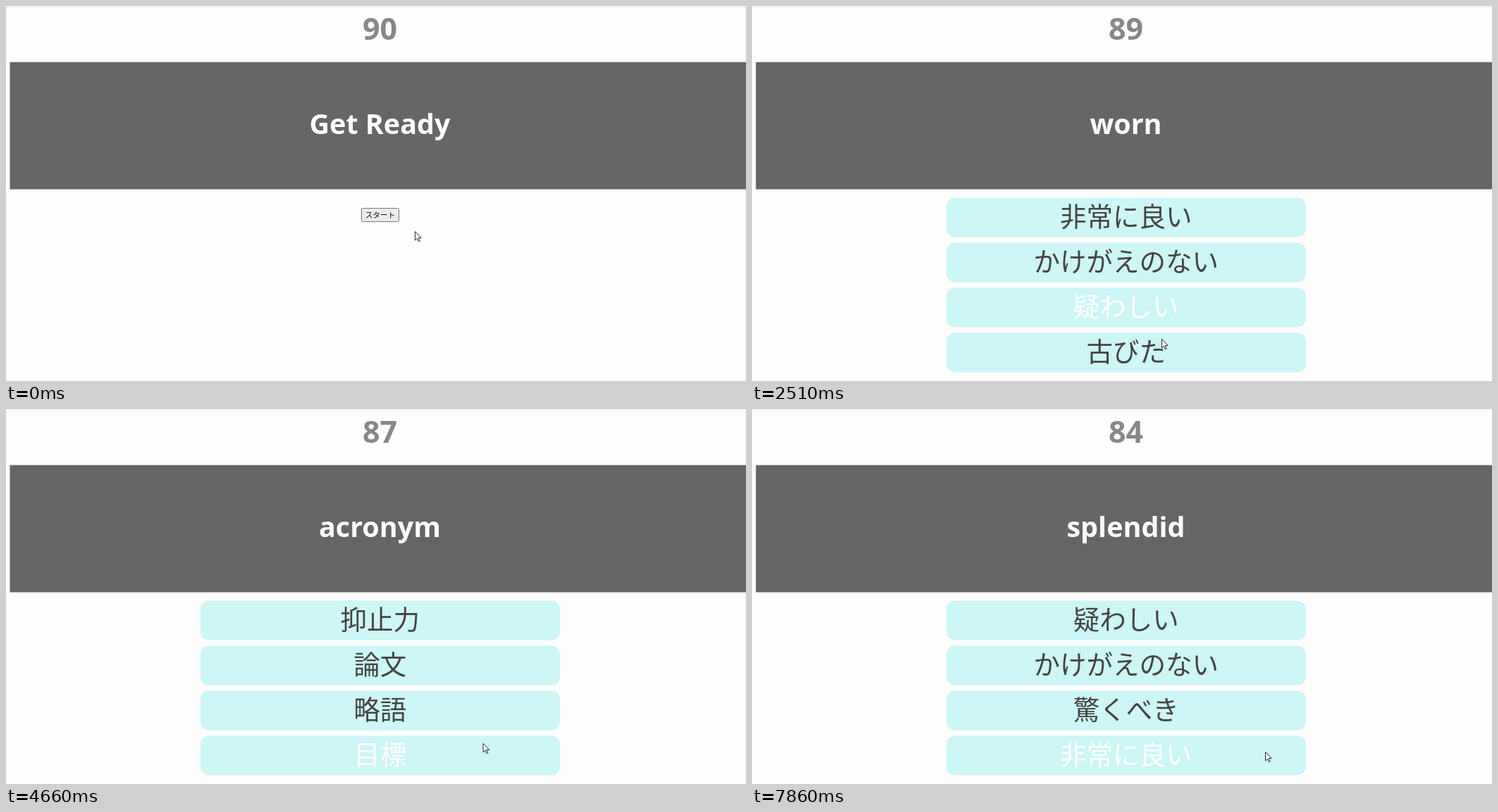
An HTML page that plays this animation: 1050x533 px, repeating every 8 s.

```html
<!DOCTYPE html>
<html lang="ja">
<head>
<meta charset="utf-8">
<title>Word quiz</title>
<style>
html, body { margin: 0; width: 100%; height: 100%; overflow: hidden; background: #fefefe; }
svg { display: block; width: 100vw; height: 100vh; }
text { text-anchor: middle; }
.bold { font-family: "Noto Sans", "Open Sans", sans-serif; font-weight: 700; }
.jp { font-family: "Noto Sans CJK JP", "Noto Sans CJK", sans-serif; }
</style>
</head>
<body>
<svg id="stage" viewBox="0 0 1050 533">
  <rect width="1050" height="533" fill="#fefefe"/>
  <rect y="1" width="1050" height="1" fill="#e9e9e9"/>
  <text id="timer" class="bold" x="530.5" y="48" font-size="43" fill="#888"></text>
  <rect x="5.5" y="79.7" width="1045" height="180.8" fill="#666"/>
  <text id="word" class="bold" x="530.5" y="182" font-size="39.5" fill="#fff"></text>
  <g id="start">
    <rect id="face" x="504.5" y="287.5" width="53" height="19" rx="2" stroke="#767676"/>
    <text class="jp" x="531" y="300.7" font-size="10.67" fill="#111">スタート</text>
  </g>
  <g id="options"></g>
  <path id="cursor" d="M.5 .5V13L3.4 10.3 5.4 14.8 7.3 14 5.3 9.6H9.2Z" fill="#fff" stroke="#111" stroke-width=".9" stroke-linejoin="round"/>
</svg>
<script>
const LOOP = 8000, STEP = 133, LAG = 75;
const PRESS = 910, FIRST_HOVER = 1970, COUNT_FROM = 1500, SECOND = 980;
const TOP = 272.5, PITCH = 64, HEIGHT = 56, LEFT = 276, WIDTH = 510;
const $ = id => document.getElementById(id);

const questions = [
  { from: 1530, solved: 2810, right: 3, word: "worn",
    answers: ["非常に良い", "かけがえのない", "疑わしい", "古びた"] },
  { from: 3350, solved: 5470, right: 2, word: "acronym",
    answers: ["抑止力", "論文", "略語", "目標"] },
  { from: 5980, solved: Infinity, right: 0, word: "splendid",
    answers: ["疑わしい", "かけがえのない", "驚くべき", "非常に良い"] }
];

// Where the pointer turns or rests: time, x, y
const turns = [
  [0, 580, 320], [510, 526, 298], [1840, 526, 298], [2090, 541, 272],
  [2360, 570, 379], [2510, 581, 473], [2930, 595, 492], [3350, 871, 144],
  [3900, 871, 144], [4510, 672, 499], [5320, 687, 420], [5470, 687, 420],
  [5740, 842, 238], [6530, 842, 238], [6900, 700, 205], [7710, 728, 487],
  [LOOP, 728, 487]
];

const easeOut = p => p * (2 - p);

function pointer(t, stepped) {
  const k = turns.findIndex(([at]) => at > t);
  const [t0, x0, y0] = turns[k - 1], [t1, x1, y1] = turns[k];
  let p = (t - t0) / (t1 - t0);
  if (stepped) {
    const n = Math.max(1, Math.round((t1 - t0) / STEP));
    p = Math.floor(p * n) / n;
  }
  const e = easeOut(p);
  return [x0 + (x1 - x0) * e, y0 + (y1 - y0) * e];
}

function optionAt([x, y]) {
  const i = Math.floor((y - TOP) / PITCH);
  const inside = x >= LEFT && x <= LEFT + WIDTH && y - TOP - i * PITCH <= HEIGHT;
  return inside ? i : -1;
}

function add(name, attrs) {
  const el = document.createElementNS("http://www.w3.org/2000/svg", name);
  for (const key in attrs) el.setAttribute(key, attrs[key]);
  return $("options").appendChild(el);
}

const options = [0, 1, 2, 3].map(i => {
  const y = TOP + i * PITCH;
  return {
    box: add("rect", { x: LEFT, y, width: WIDTH, height: HEIGHT, rx: 12 }),
    label: add("text", { class: "jp", x: 530.7, y: y + 40.5, "font-size": 37.5 })
  };
});

function drawStart(t, x, y) {
  const over = x > 504 && x < 558 && y > 287 && y < 307;
  $("face").setAttribute("fill", t >= PRESS ? "#f5f5f5" : over ? "#e5e5e5" : "#ebebeb");
}

function drawOptions(t, question) {
  const hover = t < FIRST_HOVER ? -1 : optionAt(pointer(t - LAG));
  options.forEach(({ box, label }, i) => {
    const right = t >= question.solved && i === question.right;
    box.setAttribute("fill", right ? "#90ee90" : "#cdf6f6");
    label.setAttribute("fill", right || i === hover ? "#fff" : "#444");
    label.textContent = question.answers[i];
  });
}

function draw(t) {
  const question = questions.filter(q => q.from <= t).pop();
  const [x, y] = pointer(t, true);

  $("timer").textContent = 90 - Math.max(0, Math.floor((t - COUNT_FROM) / SECOND));
  $("word").textContent = question ? question.word : "Get Ready";
  $("start").style.display = question ? "none" : "";
  $("options").style.display = question ? "" : "none";
  $("cursor").setAttribute("transform", `translate(${x} ${y})`);

  if (question) drawOptions(t, question);
  else drawStart(t, x, y);
}

const begin = performance.now();
function tick() {
  draw((performance.now() - begin) % LOOP);
  requestAnimationFrame(tick);
}
tick();
</script>
</body>
</html>
```
